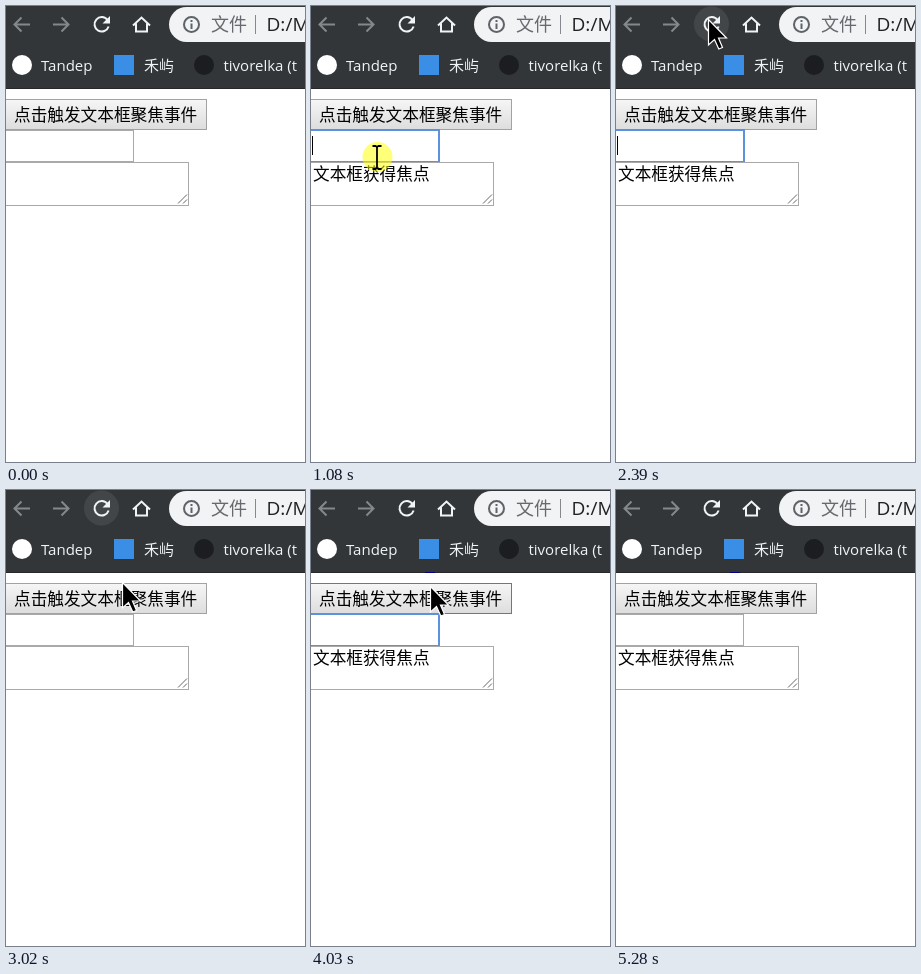
Recreate the animation shown at these times as an HTML page. Size 299 px wide and 456 px high, loop 5430 ms.

```html
<!DOCTYPE html>
<html lang="zh-CN">
<head>
<meta charset="utf-8">
<style>
  html, body { margin: 0; width: 100%; height: 100%; overflow: hidden; background: #fff; }
  svg { display: block; width: 299px; height: 456px; }
  text { font-family: "Open Sans", "Noto Sans", "Noto Sans CJK SC", "Noto Sans CJK", sans-serif; }
  .cjk { font-family: "Noto Sans CJK SC", "Noto Sans CJK", sans-serif; font-size: 16.67px; font-weight: 300; }
  .mark { font-size: 15px; font-weight: 500; fill: #f1f3f4; }
  .icon { fill: none; stroke: #f1f3f4; stroke-width: 2; }
  .dim { stroke: #85888b; }
  .box { fill: #fff; stroke: #a9a9a9; }
</style>
</head>
<body>
<svg viewBox="0 0 299 456">
  <defs>
    <linearGradient id="face" x2="0" y2="1">
      <stop stop-color="#f6f6f6"/><stop offset="1" stop-color="#ddd"/>
    </linearGradient>
    <linearGradient id="faceDown" x2="0" y2="1">
      <stop stop-color="#dcdcdc"/><stop offset="1" stop-color="#f0f0f0"/>
    </linearGradient>
  </defs>

  <!-- browser bar -->
  <rect width="299" height="83" fill="#323639"/>
  <rect y="82" width="299" height="1" fill="#27292b"/>
  <circle id="halo" cx="95.5" cy="18" r="17.5" fill="#434649"/>
  <path class="icon dim" d="M24 18.5H9M15.5 11.5L8.5 18.5L15.5 25.5M47 18.5H62M55.5 11.5L62.5 18.5L55.5 25.5"/>
  <path class="icon" d="M101.5 14A7.2 7.2 0 1 0 102.6 20.5"/>
  <path d="M104 10V17.5H96.5Z" fill="#f1f3f4"/>
  <path class="icon" d="M127 19.5L135.5 11.5L144 19.5M130 17.5V25.5H141V17.5"/>
  <rect x="163" y="1" width="160" height="35" rx="17.5" fill="#f1f3f4"/>
  <circle class="icon" cx="185.5" cy="18.5" r="7.5" style="stroke:#5f6368"/>
  <path d="M185.5 14V16M185.5 17.5V23" stroke="#5f6368" stroke-width="2"/>
  <text class="cjk" x="205" y="25" style="font-size:18px" fill="#66696d">文件</text>
  <path d="M249.5 9V28" stroke="#85888c"/>
  <text x="260.5" y="25" font-size="19" fill="#202124">D:/M</text>

  <!-- bookmarks -->
  <circle cx="16" cy="59" r="10" fill="#fff"/>
  <text class="mark" x="35" y="65">Tandep</text>
  <rect x="108" y="49" width="20" height="20" fill="#3b8ee6"/>
  <text class="mark" x="138" y="65">禾屿</text>
  <circle cx="198" cy="59" r="10" fill="#1b1d20"/>
  <text class="mark" x="217.5" y="65">tivorelka (t</text>

  <!-- page -->
  <rect id="button" x="-3.5" y="93.5" width="204" height="30"/>
  <text class="cjk" x="8" y="115">点击触发文本框聚焦事件</text>
  <rect class="box" x="-3.5" y="124.5" width="131" height="31"/>
  <rect id="ring" x="-4" y="124" width="132" height="32" fill="none" stroke="#5c90e0" stroke-width="2"/>
  <rect id="caret" x="1" y="130" width="1" height="19"/>
  <rect class="box" x="-3.5" y="156.5" width="186" height="43"/>
  <text id="message" class="cjk" x="2" y="174">文本框获得焦点</text>
  <path d="M172 197.5L181 188.5M177 197.5L181 193.5" stroke="#666"/>
  <rect id="trace" x="114" y="82" width="10" height="1" fill="#000080"/>

  <!-- pointer -->
  <g id="pointer">
    <circle id="click" cx=".5" r="15" fill="#ff0" opacity=".52"/>
    <path id="arrow" d="M.5 1.5V27L6.5 21.5L10.8 31L14.5 29.5L10.5 20H18.5Z" stroke="#fff" stroke-width="1.2"/>
    <path id="beam" d="M-4.5 -11H-1.5L0 -10L1.5 -11H4.5M0 -10V11M-4.5 12H-1.5L0 11L1.5 12H4.5" fill="none" stroke="#000" stroke-width="1.8"/>
  </g>
</svg>
<script>
const LOOP = 5430, FRAME = 78, BLINK = 530;
const $ = id => document.getElementById(id);
const show = (id, on) => $(id).style.display = on ? '' : 'none';
const within = (t, from, to) => t >= from && t < to;

// Each stroke runs evenly through its points, then the pointer rests
const strokes = [
  { from: 220, to: 620, points: [[235, 335], [58, 126]] },
  { from: 690, to: 850, points: [[58, 126], [66, 151]] },
  { from: 1610, to: 2150, points: [[66, 151], [148, 135], [100, 67], [92, 18], [92, 12]] },
  { from: 2710, to: 3330, points: [[92, 12], [116, 91], [119, 95]] },
  { from: 4330, to: 4480, points: [[119, 95], [128, 180]] }
];
const clicks = [1080, 2240, 3400];

function pointerAt(t) {
  const { from, to, points } = strokes.findLast(s => s.from <= t);
  const frames = Math.round((to - from) / FRAME);
  const frame = Math.min(frames, Math.floor((t - from) / (to - from) * frames + 0.01));
  const u = frame / frames * (points.length - 1);
  const i = Math.min(Math.floor(u), points.length - 2);
  return [0, 1].map(k => points[i][k] + (points[i + 1][k] - points[i][k]) * (u - i));
}

function draw(t) {
  const visible = within(t, 220, 4560);
  const [x, y] = visible ? pointerAt(t) : [-99, -99];
  const overText = within(y, 124, 200) && x < (y < 156 ? 128 : 183);
  const overButton = within(y, 93, 124) && x < 201;
  const pressed = within(t, 3400, 3550);
  show('pointer', visible);
  $('pointer').setAttribute('transform', `translate(${x} ${y})`);
  show('beam', overText);
  show('arrow', !overText);
  show('click', clicks.some(c => within(t, c, c + 150)));
  $('click').setAttribute('cy', overText ? 0 : 2);

  $('button').setAttribute('fill', `url(#${pressed ? 'faceDown' : 'face'})`);
  $('button').setAttribute('stroke', overButton ? '#767676' : '#a2a2a2');
  show('halo', within(t, 2000, 3160));

  const first = within(t, 1080, 2470);
  const focused = first || within(t, 3550, 5280);
  const blinks = Math.floor((t - (first ? 1080 : 3500)) / BLINK);
  show('ring', focused);
  show('caret', focused && blinks % 2 === 0);
  show('message', first || t >= 3550);
  show('trace', t >= 3550);
}

function tick() {
  draw(performance.now() % LOOP);
  requestAnimationFrame(tick);
}
tick();
</script>
</body>
</html>
```
